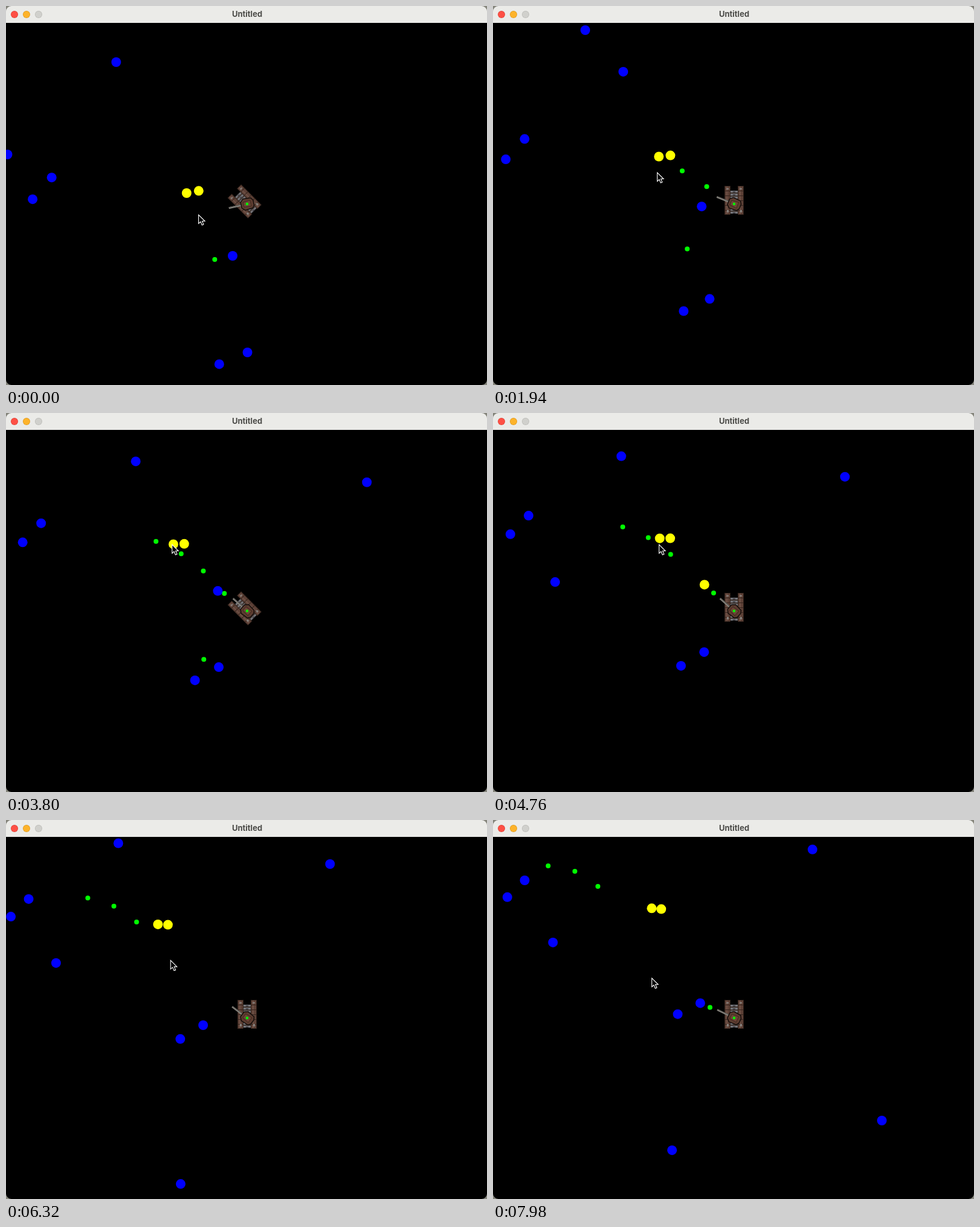
Recreate the animation shown at these times as an HTML page with a canvas. Size 798 by 628 pixels, loop 8 s.

```html
<!DOCTYPE html>
<html lang="en">
<head>
<meta charset="utf-8">
<title>Untitled</title>
<style>
  html, body { margin: 0; width: 100%; height: 100%; overflow: hidden; background: #000; }
  canvas { display: block; }
</style>
</head>
<body>
<canvas id="stage" width="798" height="628"></canvas>
<script>
const ctx = document.getElementById('stage').getContext('2d');
const TANK = { x: 400, y: 328 };
const CAMERA_SPEED = 5 / 3, ENEMY_SPEED = 0.5;

// [first step, heading, moving]: the world scrolls opposite to the heading.
const drive = [
  [0, 'SE', 1], [7, 'S', 1], [17, 'SE', 1], [36, 'S', 1], [49, 'SE', 1], [55, 'SW', 1],
  [60, 'S', 1], [61, 'SE', 1], [64, 'SE', 0], [78, 'SE', 1], [87, 'S', 1], [92, 'S', 0],
  [108, 'SE', 1], [130, 'S', 1], [141, 'SE', 1], [148, 'S', 1], [152, 'SW', 1],
  [159, 'S', 1], [160, 'S', 0]
];
const sideways = { SE: -1, S: 0, SW: 1 };

// Hits turn an enemy yellow, then red, then remove it.
const enemies = [
  { x: 182.8, y: 93 }, { x: 2.5, y: 246 }, { x: 75.8, y: 284.2 }, { x: 44.2, y: 320.2 },
  { x: 353.8, y: 593.4 }, { x: 400.6, y: 574 },
  { x: 299.7, y: 310, hits: [0] }, { x: 319.7, y: 306.3, hits: [0] },
  { x: 376, y: 414, hits: [86, 106, 123] },
  { x: 215.8, y: 110.2, born: 40 }, { x: 609.2, y: 117.5, born: 71 },
  { x: 101.1, y: 279.8, born: 98 }, { x: 289.8, y: 603.1, born: 136 },
  { x: 648, y: 500, born: 164 }
];
const enemyColors = ['#00f', '#ff0', '#f00'];

// Each shot is given by where it is seen at step `at`, with its own velocity.
const shots = [
  { at: 0, x: 346.3, y: 420, vx: 0.47, vy: 1.24, born: 0, dies: 100 },
  { at: 23, x: 358.3, y: 310, vx: -1.262, vy: -0.376, born: 19 },
  { at: 59, x: 329, y: 260, vx: -1.234, vy: -0.507, born: 32 },
  { at: 59, x: 365.4, y: 289.2, vx: -1.218, vy: -0.543, born: 50 },
  { at: 82, x: 362.3, y: 299, vx: -1, vy: -0.88, born: 77, dies: 86 },
  { at: 92, x: 376, y: 307, vx: -1, vy: -0.88, born: 92, dies: 106 },
  { at: 121, x: 341, y: 275, vx: -1, vy: -0.88, born: 108, dies: 123 },
  { at: 171, x: 360, y: 310.4, vx: -1.2, vy: -0.58, born: 161 }
];

const pointerPath = [
  [0, 319.5, 346], [23, 281.5, 287], [59, 263.5, 265], [77, 275.5, 218],
  [128, 275.5, 218], [151, 268.5, 260], [162, 263.5, 262], [172, 263.5, 262]
];

// Steps last 20, 20 and 100 ms in turn.
function stepAt(ms) {
  const shifted = ms + 20, rest = shifted % 140;
  return 3 * Math.floor(shifted / 140) + (rest < 20 ? 0 : rest < 40 ? 1 : 2) - 1;
}

const driveAt = n => drive.filter(d => d[0] <= n).pop();

const camera = [{ x: 0, y: 0 }];
for (let n = 0; n < 172; n++) {
  const [, heading, moving] = driveAt(n), c = camera[n];
  camera.push({
    x: c.x + sideways[heading] * moving * CAMERA_SPEED,
    y: c.y - moving * CAMERA_SPEED
  });
}

function enemyAt(enemy, n) {
  let { x, y, born = 0 } = enemy;
  for (let i = born; i < n; i++) {
    const dx = TANK.x - x, dy = TANK.y - y, d = Math.hypot(dx, dy);
    x += camera[i + 1].x - camera[i].x + ENEMY_SPEED * dx / d;
    y += camera[i + 1].y - camera[i].y + ENEMY_SPEED * dy / d;
  }
  return { x, y };
}

function pointerAt(n) {
  const i = pointerPath.findIndex(p => p[0] > n);
  const [n0, x0, y0] = pointerPath[i - 1], [n1, x1, y1] = pointerPath[i];
  const k = (n - n0) / (n1 - n0);
  return { x: x0 + (x1 - x0) * k, y: y0 + (y1 - y0) * k };
}

function disc(x, y, r, color) {
  ctx.fillStyle = color;
  ctx.beginPath();
  ctx.arc(x, y, r, 0, 2 * Math.PI);
  ctx.fill();
}

function rect(color, x, y, w, h) {
  ctx.fillStyle = color;
  ctx.fillRect(x, y, w, h);
}

function polygon(points, fill, stroke, width = 1) {
  ctx.beginPath();
  points.forEach(([x, y]) => ctx.lineTo(x, y));
  ctx.closePath();
  ctx.fillStyle = fill;
  ctx.fill();
  ctx.strokeStyle = stroke;
  ctx.lineWidth = width;
  ctx.stroke();
}

function drawHull(angle) {
  ctx.save();
  ctx.translate(TANK.x, TANK.y);
  ctx.rotate(angle);
  rect('#3f342f', -7, -22, 14, 38);
  for (let y = -22; y < 15; y += 5) {
    rect('#75757a', -6, y, 12, 3);
    rect('#45454a', -2, y + 1, 4, 2);
  }
  for (const x of [-16, 6]) {
    rect('#33231c', x, -30, 10, 48);
    rect('#5c4036', x + 1, -29, 8, 46);
    rect('#6e5045', x + 3, -29, 2, 46);
    for (let y = -22; y < 16; y += 8) rect('#33231c', x + 1, y, 8, 1);
    rect('#85807c', x + 3, -26, 4, 2);
    rect('#85807c', x + 4, 10, 3, 4);
  }
  ctx.restore();
}

function drawTurret(angle) {
  ctx.save();
  ctx.translate(TANK.x, TANK.y);
  ctx.rotate(angle);
  rect('#85827c', 8, -1.5, 23, 3);
  rect('#504e4a', 8, 0.5, 23, 1);
  polygon([[10, -5], [10, 5], [5, 9.5], [-8, 8.5], [-11, 4], [-11, -4], [-8, -8.5], [5, -9.5]],
    '#5c3c30', '#140e0b', 1.5);
  polygon([[6, -4], [6, 4], [-6, 5], [-6, -5]], '#6c4637', '#402a20');
  ctx.restore();
  disc(TANK.x, TANK.y, 2.2, '#0f0');
}

function drawPointer({ x, y }) {
  ctx.save();
  ctx.translate(x, y);
  polygon([[0, 0], [0, 14.5], [3.3, 11.5], [5.7, 17], [8.3, 16], [6, 10.5], [10.5, 10.5]],
    '#000', '#fff', 1.1);
  ctx.restore();
}

function drawWindow() {
  rect('#ebebe8', 0, 0, 798, 28);
  [['#fe5045', '#dd4238'], ['#fdb32a', '#dd981c'], ['#d0d0cc', '#b9b9b5']].forEach(([fill, edge], i) => {
    disc(14 + 20 * i, 14, 6, edge);
    disc(14 + 20 * i, 14, 5.3, fill);
  });
  ctx.fillStyle = '#494946';
  ctx.font = '700 13px Inter, sans-serif';
  ctx.textAlign = 'center';
  ctx.fillText('Untitled', 400, 18);

  ctx.fillStyle = '#85857c';
  ctx.beginPath();
  ctx.rect(0, 0, 798, 628);
  ctx.roundRect(0, 0, 798, 628, 9);
  ctx.fill('evenodd');
}

function draw(n) {
  rect('#000', 0, 0, 798, 628);

  for (const s of shots) {
    if (n < s.born || n >= (s.dies ?? Infinity)) continue;
    const age = n - s.at;
    disc(s.x + s.vx * age + camera[n].x - camera[s.at].x,
         s.y + s.vy * age + camera[n].y - camera[s.at].y, 4, '#0f0');
  }

  for (const e of enemies) {
    const damage = (e.hits ?? []).filter(h => h <= n).length;
    if (n < (e.born ?? 0) || damage > 2) continue;
    const { x, y } = enemyAt(e, n);
    disc(x, y, 8, enemyColors[damage]);
  }

  const pointer = pointerAt(n);
  drawHull(sideways[driveAt(n)[1]] * Math.PI / 4);
  drawTurret(Math.atan2(pointer.y - TANK.y, pointer.x - TANK.x));
  drawWindow();
  drawPointer(pointer);
}

const start = performance.now();
function tick() {
  draw(stepAt((performance.now() - start) % 8000));
  requestAnimationFrame(tick);
}
tick();
</script>
</body>
</html>
```
